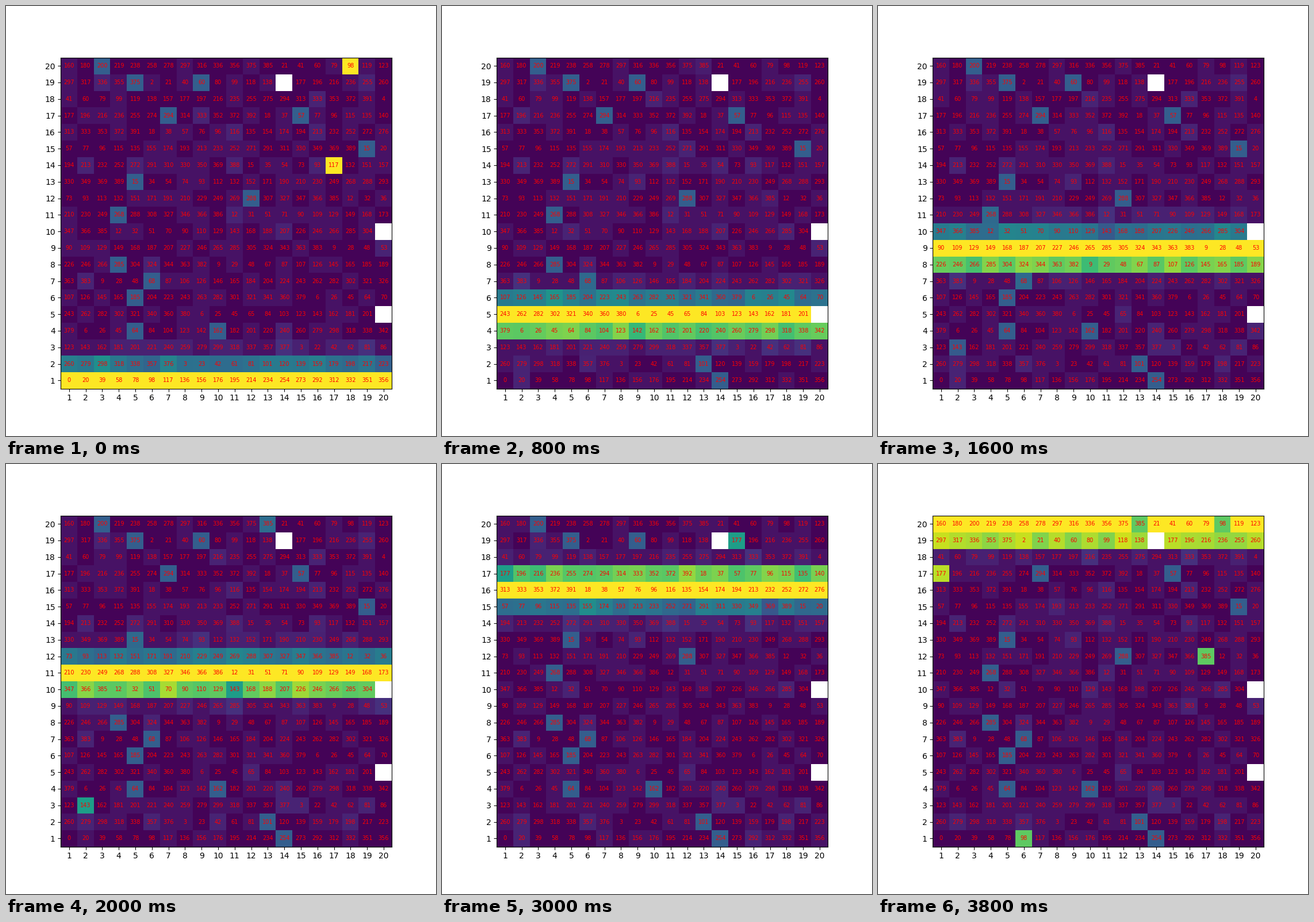
Animation, 748 px wide and 748 px high, one loop 4000 ms. Source, as a matplotlib script:

```python
import numpy as np
import matplotlib.pyplot as plt
from matplotlib.animation import FuncAnimation

N = 20
IDS = 393
rng = np.random.default_rng(12)

# (row, column), both counted from 1
HOT = [(1, 14), (2, 13), (4, 5), (4, 10), (6, 5), (7, 6), (8, 4), (11, 4),
       (12, 12), (13, 5), (15, 19), (17, 7), (17, 15), (19, 5), (19, 9),
       (20, 3)]
DEAD = [(5, 20), (10, 20), (19, 14)]
SHARED = [((1, 6), (20, 18)), ((1, 7), (14, 17)), ((3, 2), (10, 11)),
          ((12, 17), (20, 13)), ((19, 15), (17, 1))]


def at(cell):
    return cell[0] - 1, cell[1] - 1


def make_ids():
    """Channels wind round the grid: even steps along rows and columns."""
    row, col = np.indices((N, N))
    key = 256.5 * row + 19.5 * col + 3 * np.sign(row)
    key[:, -1] = key[:, -2] + 5
    ids = np.rint(key).astype(int) % IDS
    for a, b in SHARED:
        ids[at(b)] = ids[at(a)]
    return ids


def speckle():
    return rng.choice([.01, .05, .1], size=(N, N), p=[.55, .38, .07])


base = speckle()
for cell in HOT:
    base[at(cell)] = .3

# Rows are joined in pairs, and the top row leans on the one below.
coupling = np.where(np.arange(1, N) % 2, .39, .76)
coupling[-1] = .86


def make_field(active):
    """Response of all cells while one row is driven."""
    flicker = (rng.random((N, N)) < .15) & (base < .2)
    v = np.where(flicker, speckle(), base)
    for row in range(N):
        gap = abs(row - active)
        if gap == 0:
            v[row] = 1
        elif gap == 1:
            v[row] = rng.normal(coupling[min(row, active)], .04, N)
        elif gap == 2:
            v[row] += .04
    for a, b in SHARED:
        v[at(a)] = v[at(b)] = max(v[at(a)], .75 * v[at(b)])
    for cell in DEAD:
        v[at(cell)] = np.nan
    return np.clip(v, 0, 1)


fields = [make_field(row) for row in range(N)]
ids = make_ids()

fig, ax = plt.subplots(figsize=(7.48, 7.48), dpi=100)
image = ax.imshow(fields[0], origin="lower", cmap="viridis", vmin=0, vmax=1,
                  interpolation="nearest")
ax.set_xticks(range(N), range(1, N + 1))
ax.set_yticks(range(N), range(1, N + 1))

for (row, col), channel in np.ndenumerate(ids):
    if (row + 1, col + 1) not in DEAD:
        ax.text(col, row, str(channel), color="red", fontsize=7,
                ha="center", va="center")


def update(i):
    image.set_data(fields[i])
    return [image]


anim = FuncAnimation(fig, update, frames=N, interval=200, repeat=True,
                     repeat_delay=0)
plt.show()
```
